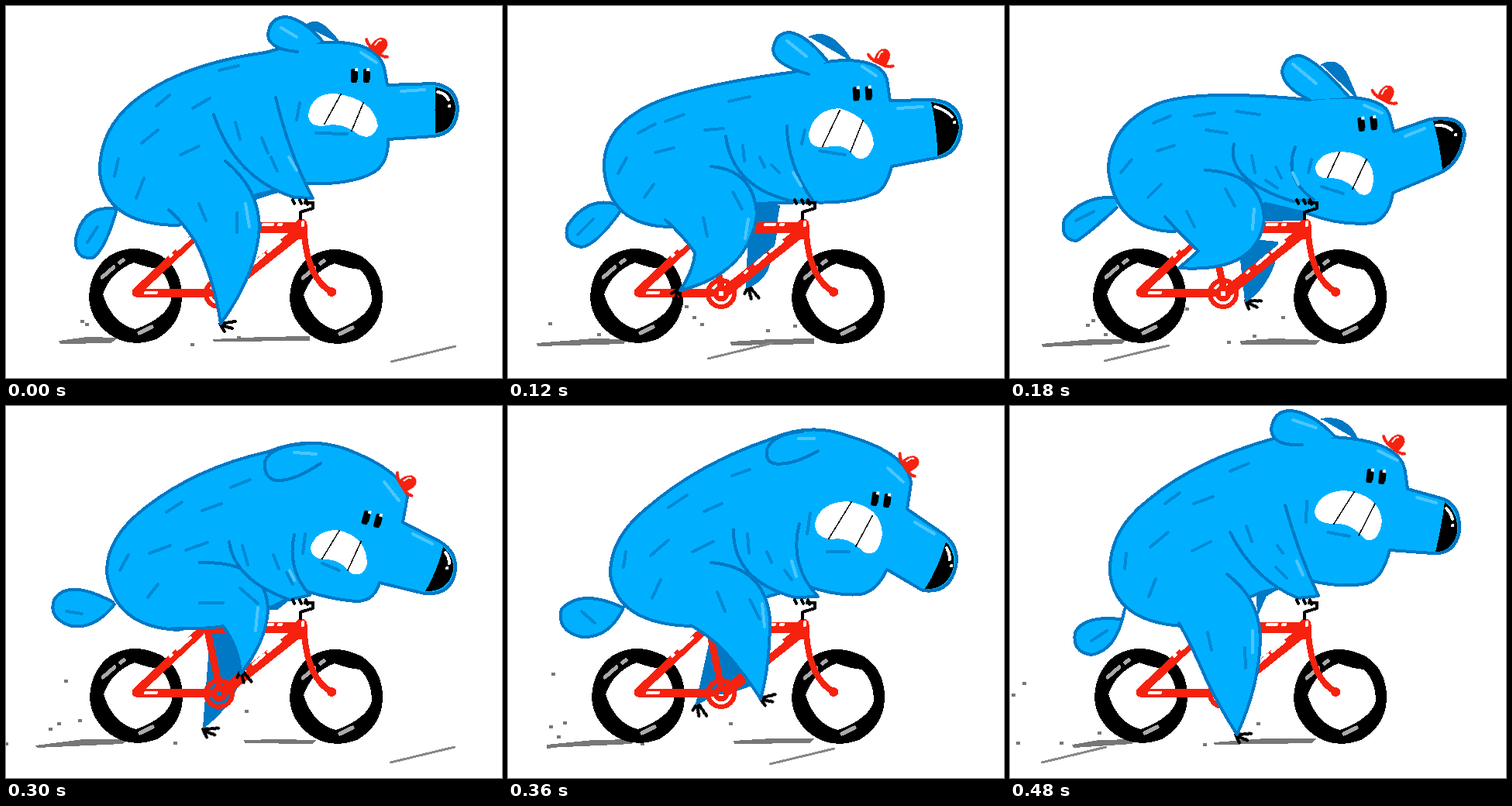
Recreate the animation shown at these times as an HTML page without scripts. Size 640 by 480 pixels, loop 540 ms.

```html
<!DOCTYPE html>
<html lang="en">
<head>
<meta charset="utf-8">
<title>Bear on a bike</title>
<style>
html, body { margin: 0; width: 100%; height: 100%; overflow: hidden; background: #fff }
svg { display: block; width: 100%; height: 100%; shape-rendering: crispEdges; fill: none; stroke-linecap: round; stroke-linejoin: round }

/* Nine steps of 60 ms: six drawn poses, steps(2) adds the halfway ones */
.a { animation: .54s steps(2, end) infinite }
.skin { fill: #00b0ff; stroke: #0078c4; stroke-width: 4 }
.far { fill: #0078c4; stroke: #0078c4; stroke-width: 2 }
.red { stroke: #f5220f }
.ink { stroke: #000; stroke-width: 4 }

#wheel { animation-name: wheel }
@keyframes wheel {
  0% { transform: translate(0, 0) }
  22.2%, 33.29% { transform: translate(-1px, 0) }
  33.3% { transform: translate(0, 0) }
  55.5%, 66.59% { transform: translate(1px, 0) }
  66.6% { transform: translate(1px, 0) }
  88.8%, 100% { transform: translate(2px, 0) }
}

#streak { animation-name: streak }
@keyframes streak {
  0% { transform: translate(497px, 459px) }
  22.2%, 33.29% { transform: translate(258px, 455px) }
  33.3%, 44.39% { transform: translate(122px, 458px) }
  44.4%, 55.49% { transform: translate(-90px, 459px) }
  55.5%, 66.59% { transform: translate(496px, 460px) }
  66.6% { transform: translate(338px, 462px) }
  88.8%, 100% { transform: translate(41px, 460px) }
}

#ground { animation-name: ground }
@keyframes ground {
  0% { d: path("M68 432L105 427 145 428 135 435 70 436ZM267 430L330 427 392 426 392 432 268 433Z") }
  22.2%, 33.29% { d: path("M37 435L110 429 152 430 150 436 38 439ZM287 433L340 430 395 429 395 436 288 438Z") }
  33.3% { d: path("M41 436L105 430 150 430 145 436 42 440ZM297 432L340 429 400 431 395 437 298 437Z") }
  55.5%, 66.59% { d: path("M38 438L100 430 160 430 150 436 40 441ZM307 431L350 430 400 431 395 436 308 435Z") }
  66.6% { d: path("M50 437L110 431 165 430 160 436 52 441ZM291 432L340 429 395 429 390 435 292 436Z") }
  88.8%, 100% { d: path("M80 437L115 431 160 430 158 436 82 441ZM263 434L330 429 395 429 390 435 264 437Z") }
}

#dust { animation-name: dust }
@keyframes dust {
  0% { d: path("M98 407h1M104 411h1M240 437h1M100 430h1M300 428h1M330 430h1M120 430h1") }
  22.2%, 33.29% { d: path("M54 410h1M230 388h1M240 402h1M250 411h1M335 419h1M370 413h1M117 424h1") }
  33.3% { d: path("M100 412h1M107 406h1M282 434h1M352 402h1M315 426h1M228 391h1M123 424h1") }
  55.5%, 66.59% { d: path("M77 355h1M95 406h1M68 410h1M0 436h1M310 394h1M218 435h1M57 417h1") }
  66.6% { d: path("M58 346h1M73 409h1M55 414h1M52 440h1M287 410h1M173 436h1M65 427h1") }
  88.8%, 100% { d: path("M18 358h1M4 373h1M10 435h1M66 435h1M251 437h1M115 422h1M320 410h1") }
}

#farFoot { animation-name: farFoot }
@keyframes farFoot {
  0% { transform: translate(280px, 340px) rotate(60deg) }
  22.2%, 33.29% { transform: translate(311px, 361px) rotate(60deg) }
  33.3% { transform: translate(304px, 380px) rotate(10deg) }
  55.5%, 66.59% { transform: translate(254px, 417px) rotate(5deg) }
  66.6% { transform: translate(245px, 383px) rotate(65deg) }
  88.8%, 100% { transform: translate(282px, 350px) }
}

#farLeg { animation-name: farLeg }
@keyframes farLeg {
  0% { d: path("M290 250L310 250Q322 280 312 320Q300 350 285 370Z") }
  22.2%, 33.29% { d: path("M312 262L345 262Q352 285 335 340Q325 358 308 363Z") }
  33.3% { d: path("M295 300L345 305Q345 335 325 362Q315 375 304 381Z") }
  55.5%, 66.59% { d: path("M265 285L325 300Q310 340 292 375Q280 395 255 415Z") }
  66.6% { d: path("M262 298L325 355Q290 372 262 372Q255 380 243 385Z") }
  88.8%, 100% { d: path("M290 250L305 250Q312 300 308 340Q300 370 290 390Z") }
}

#farArm { animation-name: farArm }
@keyframes farArm {
  0% { d: path("M318 236L352 240 340 243 322 249Z") }
  22.2%, 33.29% { d: path("M318 250L350 258 346 280 320 280Z") }
  33.3% { d: path("M325 250L385 256 378 276 328 277Z") }
  55.5%, 66.59% { d: path("M330 250L365 250 350 262 338 262Z") }
  66.6% { d: path("M310 230L340 235 336 240 320 245Z") }
  88.8%, 100% { d: path("M318 230L345 236 330 245 320 268Z") }
}

#tail { animation-name: tail }
@keyframes tail {
  0% { d: path("M143 262Q100 255 90 300Q88 327 112 325Q128 315 143 262") }
  22.2%, 33.29% { d: path("M145 258Q105 242 77 283Q70 308 95 311Q115 308 147 262") }
  33.3% { d: path("M138 247Q95 244 70 275Q64 302 86 303Q100 295 138 260") }
  55.5%, 66.59% { d: path("M138 253Q80 222 62 250Q54 275 85 284Q115 288 140 256") }
  66.6% { d: path("M148 260Q95 235 69 262Q62 290 95 298Q132 300 150 258") }
  88.8%, 100% { d: path("M142 275Q96 270 84 292Q80 318 105 321Q138 316 148 262") }
}

#farEar { animation-name: farEar }
@keyframes farEar {
  0% { d: path("M386 26Q400 14 415 30Q425 38 430 48") }
  22.2%, 33.29% { d: path("M389 40Q405 32 422 45Q434 55 444 72") }
  33.3% { d: path("M402 76Q420 66 433 85Q440 100 448 120") }
  55.5%, 66.59% { d: path("M420 66Q430 60 440 66Q445 68 450 72") }
  66.6% { d: path("M410 50Q420 45 430 50Q440 55 445 60") }
  88.8%, 100% { d: path("M402 17Q425 13 438 27Q446 35 448 44") }
}

#body { animation-name: body }
@keyframes body {
  0% { d: path("M325 243L222 283Q128 282 121 215Q120 160 165 123Q225 75 335 60Q385 44 430 47Q484 50 489 85L492 102 552 100Q582 104 583 133Q581 165 552 168L493 172Q494 206 470 217Q440 231 390 229Z") }
  22.2%, 33.29% { d: path("M320 255L212 285Q130 285 124 210Q122 165 165 138Q210 106 370 85Q400 70 440 70Q483 72 489 95L493 122 548 121Q584 124 585 157Q582 192 552 196L495 207Q487 240 470 243Q440 256 385 253Z") }
  33.3% { d: path("M330 255L212 291Q136 290 127 212Q127 160 180 131Q225 105 385 121Q410 117 440 118Q485 121 490 142L495 162 542 146Q585 140 587 166Q582 202 556 215L494 241Q490 272 468 280Q425 284 385 268Z") }
  55.5%, 66.59% { d: path("M338 262L222 289Q140 285 130 215Q129 170 180 131Q245 80 338 59Q390 38 440 56Q512 84 518 117L512 150 560 175Q582 188 580 212Q575 245 540 242L482 228Q476 250 455 252Q425 251 385 238Z") }
  66.6% { d: path("M338 245L238 284Q142 282 132 218Q131 170 180 131Q245 75 338 43Q390 20 440 39Q517 62 520 100L515 133 560 164Q583 180 578 207Q570 243 535 238L489 211Q476 239 455 243Q425 246 385 232Z") }
  88.8%, 100% { d: path("M325 240L222 284Q135 278 129 215Q127 160 180 120Q240 70 340 42Q390 36 440 42Q505 50 510 85L513 107 560 120Q582 130 580 162Q574 192 545 190L490 186Q480 224 460 229Q430 235 390 226Z") }
}

#ear { animation-name: ear }
@keyframes ear {
  0% { d: path("M376 59Q340 56 338 38Q340 14 362 14Q385 18 408 45") }
  22.2%, 33.29% { d: path("M388 88Q342 75 342 56Q345 34 364 34Q386 38 412 71") }
  33.3% { d: path("M386 121Q352 104 351 84Q355 64 374 64Q394 68 438 118") }
  55.5%, 66.59% { d: path("M406 74Q370 98 348 96Q332 92 334 72Q340 52 385 49") }
  66.6% { d: path("M400 58Q365 78 342 74Q332 70 334 56Q342 36 380 33") }
  88.8%, 100% { d: path("M377 50Q338 52 337 30Q340 6 362 6Q390 8 420 40") }
}

#foot { animation-name: foot }
@keyframes foot {
  0% { transform: translate(276px, 410px) }
  22.2%, 33.29% { transform: translate(221px, 365px) rotate(90deg) }
  33.3% { transform: translate(250px, 315px) rotate(60deg) }
  55.5%, 66.59% { transform: translate(304px, 340px) rotate(60deg) }
  66.6% { transform: translate(325px, 377px) rotate(-5deg) }
  88.8%, 100% { transform: translate(291px, 424px) rotate(5deg) }
}

#leg { animation-name: leg }
@keyframes leg {
  0% { d: path("M283 200Q326 235 327 285Q324 345 277 410Q268 350 245 305Q225 275 210 263") }
  22.2%, 33.29% { d: path("M262 207Q318 212 321 270Q310 345 222 367Q240 340 241 318Q225 295 203 276") }
  33.3% { d: path("M252 212Q325 215 328 275Q320 345 218 338Q230 328 243 316Q225 300 200 272") }
  55.5%, 66.59% { d: path("M250 202Q338 200 338 265Q335 305 303 345Q300 310 280 284Q260 288 215 287") }
  66.6% { d: path("M262 202Q332 208 338 275Q338 335 326 378Q305 345 278 315Q258 295 236 283") }
  88.8%, 100% { d: path("M280 217Q322 248 323 300Q322 360 293 424Q268 385 252 350Q235 310 218 280") }
}

#arm { animation-name: arm }
@keyframes arm {
  0% { d: path("M268 140Q295 222 372 247L396 248Q365 190 348 118") }
  22.2%, 33.29% { d: path("M281 168Q290 235 368 252L394 252Q360 205 360 155") }
  33.3% { d: path("M289 178Q278 225 365 252L392 250Q352 222 368 182") }
  55.5%, 66.59% { d: path("M288 175Q295 225 366 250L392 244Q362 210 372 166") }
  66.6% { d: path("M291 160Q290 225 370 247L400 246Q362 205 376 152") }
  88.8%, 100% { d: path("M284 163Q315 225 372 248L398 245Q372 190 355 128") }
}

#fur { animation-name: fur }
@keyframes fur {
  0% { d: path("M194 129L211 115M241 132L263 119M275 83L300 77M175 177L196 160M225 192L249 181M140 220L145 197M168 248L178 222M296 150L302 172M330 170L338 190M342 195L350 213M249 255L258 277M298 267L298 292M379 125L375 147M400 164L440 165M105 305L118 285") }
  22.2%, 33.29% { d: path("M168 164L190 152M203 149L227 140M285 123L312 117M190 189L214 183M254 160L278 158M142 216L153 196M176 247L188 230M303 180L305 200M325 195L331 208M340 205L350 215M252 273L257 297M290 240L302 262M383 160L379 178M402 187L435 192M90 295L110 275") }
  33.3% { d: path("M185 151L207 142M238 142L264 138M292 136L322 140M190 187L212 180M253 160L280 164M143 215L157 198M178 247L195 230M312 193L316 215M343 208L350 222M330 225L345 235M228 265L238 285M278 236L290 258M389 198L385 215M402 233L430 242M85 277L108 265") }
  55.5%, 66.59% { d: path("M207 137L227 124M253 135L278 126M290 105L315 95M185 190L212 180M232 186L260 176M147 212L158 192M183 247L196 230M305 180L312 205M345 192L352 210M362 215L370 230M250 254L280 254M302 235L325 255M386 165L383 190M408 203L430 212M78 265L98 268") }
  66.6% { d: path("M207 131L231 115M253 136L276 126M289 90L312 82M184 193L207 173M238 188L265 175M149 208L152 188M186 248L197 224M309 165L311 190M334 188L340 202M357 212L366 224M270 240L280 265M312 250L325 275M390 138L386 165M412 188L440 188M95 265L112 280") }
  88.8%, 100% { d: path("M200 126L219 112M237 126L262 117M284 84L308 74M181 182L204 163M235 187L259 175M148 210L150 190M179 246L188 223M305 155L312 175M345 180L352 190M343 208L357 222M255 292L260 315M303 312L304 338M383 123L382 150M410 163L438 168M105 303L125 290") }
}

#glow { animation-name: glow }
@keyframes glow {
  0% { d: path("M355 28L375 40M458 60L478 73M510 110L540 108M309 255L314 285M365 195L375 212") }
  22.2%, 33.29% { d: path("M360 45L385 65M457 78L475 90M503 132L535 130M310 275L306 300M368 215L378 232") }
  33.3% { d: path("M365 75L395 100M457 128L480 138M510 168L535 158M315 262L313 288M365 215L372 230") }
  55.5%, 66.59% { d: path("M372 60L400 62M488 98L507 122M525 165L550 178M325 260L322 290M366 212L372 225") }
  66.6% { d: path("M375 42L395 42M490 80L510 98M525 150L550 165M328 255L331 285M366 200L372 220") }
  88.8%, 100% { d: path("M365 18L395 28M475 58L500 70M525 118L550 125M313 290L313 318M370 200L378 218") }
}

#nose { animation-name: nose }
@keyframes nose {
  0% { d: path("M554 105Q579 108 580 133Q577 162 554 164Q553 135 554 105") }
  22.2%, 33.29% { d: path("M546 124Q580 128 582 157Q577 188 554 193Q554 158 546 124") }
  33.3% { d: path("M546 148Q583 144 584 166Q580 198 558 211Q555 180 546 148") }
  55.5%, 66.59% { d: path("M564 182Q579 195 577 212Q571 240 541 239Q557 212 564 182") }
  66.6% { d: path("M565 175Q577 188 575 207Q567 238 538 236Q555 210 565 175") }
  88.8%, 100% { d: path("M561 124Q579 138 577 163Q571 188 549 188Q556 160 561 124") }
}

#shine { animation-name: shine }
@keyframes shine {
  0% { d: path("M557 111Q567 112 571 121M572 129h.5") }
  22.2%, 33.29% { d: path("M551 130Q565 134 573 143M576 150h.5") }
  33.3% { d: path("M550 154Q562 153 570 160M575 166h.5") }
  55.5%, 66.59% { d: path("M567 189Q572 195 572 203M569 209h.5") }
  66.6% { d: path("M566 183Q570 190 570 198M572 206h.5") }
  88.8%, 100% { d: path("M563 132Q569 138 571 146M571 154h.5") }
}

#mouth { animation-name: mouth }
@keyframes mouth {
  0% { d: path("M390 140Q395 112 425 113Q475 120 480 155Q472 175 455 166Q435 150 415 154Q390 158 390 140") }
  22.2%, 33.29% { d: path("M388 165Q395 133 428 132Q470 145 472 178Q465 203 448 195Q435 176 412 182Q388 185 388 165") }
  33.3% { d: path("M394 207Q400 188 428 188Q468 190 469 222Q468 250 450 242Q436 222 412 222Q394 224 394 207") }
  55.5%, 66.59% { d: path("M393 182Q400 160 428 160Q465 168 466 203Q462 222 445 216Q432 198 412 198Q393 197 393 182") }
  66.6% { d: path("M396 152Q402 124 438 123Q482 130 483 165Q478 198 458 188Q440 168 418 172Q396 170 396 152") }
  88.8%, 100% { d: path("M393 135Q400 110 432 109Q476 114 480 148Q476 178 458 172Q440 150 418 152Q393 152 393 135") }
}

#gaps { animation-name: gaps }
@keyframes gaps {
  0% { d: path("M432 114L411 152M461 125L446 161") }
  22.2%, 33.29% { d: path("M428 135L406 181M458 148L442 188") }
  33.3% { d: path("M425 189L410 221M460 198L442 236") }
  55.5%, 66.59% { d: path("M430 161L408 197M458 175L441 212") }
  66.6% { d: path("M443 124L414 171M470 142L449 181") }
  88.8%, 100% { d: path("M444 111L418 152M471 126L450 167") }
}

#eyes { animation-name: eyes }
@keyframes eyes {
  0% { transform: translate(457px, 90px) }
  22.2%, 33.29% { transform: translate(457px, 113px) rotate(-3deg) }
  33.3% { transform: translate(461px, 152px) rotate(-6deg) }
  55.5%, 66.59% { transform: translate(472px, 146px) rotate(15deg) }
  66.6% { transform: translate(481px, 121px) rotate(8deg) }
  88.8%, 100% { transform: translate(472px, 91px) rotate(6deg) }
}

#hat { animation-name: hat }
@keyframes hat {
  0% { transform: translate(477px, 57px) rotate(40deg) }
  22.2%, 33.29% { transform: translate(480px, 73px) rotate(25deg) }
  33.3% { transform: translate(482px, 120px) rotate(28deg) }
  55.5%, 66.59% { transform: translate(512px, 103px) rotate(58deg) }
  66.6% { transform: translate(513px, 78px) rotate(57deg) }
  88.8%, 100% { transform: translate(494px, 53px) rotate(40deg) }
}
</style>
</head>
<body>
<svg viewBox="0 0 640 480">
  <defs>
    <g id="tyre">
      <path fill="#000" fill-rule="evenodd" d="M107 375Q109 340 134 322Q164 304 200 322Q228 340 227 378Q225 412 194 430Q160 442 134 424Q108 405 107 375ZM125 372Q135 343 165 331Q183 338 198 339Q213 355 213 380Q207 402 167 417Q137 410 125 372Z"/>
      <path stroke="#aaa" stroke-width="5" d="M124 350L139 337M147 331L151 328M172 422L188 414"/>
    </g>
    <path id="claws" class="ink" d="M0 0L20-3M2 2L16 6M1 2L6 10"/>
  </defs>

  <!-- road -->
  <path id="ground" class="a" fill="#777"/>
  <path id="dust" class="a" stroke="#777" stroke-width="4" stroke-linecap="square"/>
  <path id="streak" class="a" stroke="#888" stroke-width="3" d="M0 0L83-20"/>

  <g id="wheel" class="a"><use href="#tyre"/></g>
  <use href="#tyre" x="259" y="1"/>

  <!-- far limbs -->
  <g id="farFoot" class="a"><use href="#claws"/></g>
  <path id="farLeg" class="a far"/>
  <path id="farArm" class="a far"/>

  <!-- bike -->
  <g class="red">
    <path stroke-width="11" d="M168 369L250 292M168 370H262"/>
    <path stroke-width="9" d="M260 290L275 362"/>
    <path stroke-width="14" d="M284 366L380 290M254 286H382"/>
    <path stroke-width="15" d="M381 282V294"/>
    <path stroke-width="8" d="M385 296Q390 352 420 369"/>
    <circle cx="275" cy="371" r="17" stroke-width="6"/>
    <circle cx="275" cy="371" r="7" stroke-width="7"/>
    <path stroke-width="12" d="M420 369h.1"/>
  </g>
  <path stroke="#fff" stroke-width="4" d="M180 370H194M212 323L214 321M221 314L238 299M306 344L308 342M319 333L333 321M338 317L354 304M332 282H344M352 282H355M383 279V283"/>

  <!-- bear -->
  <path id="tail" class="a skin"/>
  <path id="farEar" class="a far"/>
  <g id="foot" class="a"><use href="#claws"/></g>
  <path id="body" class="a skin"/>
  <path id="ear" class="a skin"/>
  <path id="leg" class="a skin"/>
  <path id="arm" class="a skin"/>
  <path id="fur" class="a" stroke="#0088d4" stroke-width="4"/>
  <path id="glow" class="a" stroke="#4cc6ff" stroke-width="4"/>
  <path id="nose" class="a" fill="#000"/>
  <path id="shine" class="a" stroke="#fff" stroke-width="4"/>
  <path id="mouth" class="a" fill="#fff"/>
  <path id="gaps" class="a" stroke="#000" stroke-width="1.5"/>
  <g id="eyes" class="a">
    <path stroke="#000" stroke-width="9" d="M-8-5V5M8-5V5"/>
    <path stroke="#fff" stroke-width="4" d="M-5-8h.1M10-8h.1"/>
  </g>
  <g id="hat" class="a">
    <path fill="#f5220f" d="M-9-1Q-10-19 1-19Q11-18 9-1Z"/>
    <path class="red" stroke-width="4" d="M-18-3Q-12 2 0 1Q12 2 17-3"/>
    <path stroke="#fff" stroke-width="2" d="M-5-5Q-6-11-3-14"/>
  </g>

  <!-- grip and stem -->
  <path class="ink" d="M370 250L372 255M379 250L381 255M387 250L389 256"/>
  <path class="ink" stroke-linecap="butt" d="M384 254H396V261L380 266V276"/>
</svg>
</body>
</html>
```
